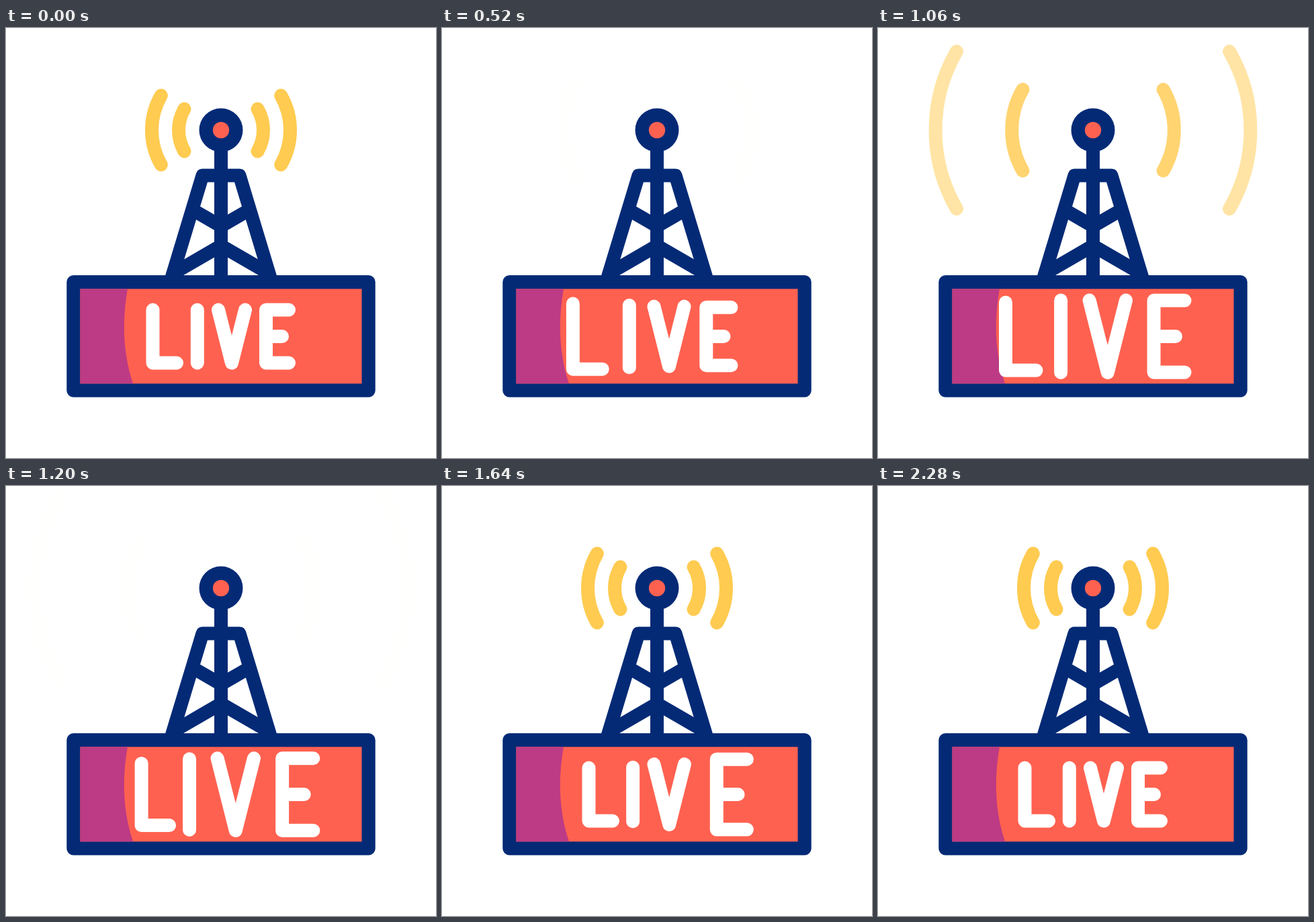
Animation of 640x640 px, one loop 2400 ms. Source, as an HTML page:

```html
<!DOCTYPE html>
<html lang="en">
<head>
<meta charset="utf-8">
<title>Live broadcast</title>
<style>
  html, body { margin: 0; width: 100%; height: 100%; overflow: hidden; background: #fff; }
  svg { display: block; width: 100vw; height: 100vh; }
  .line { fill: none; stroke-width: 20; stroke-linecap: round; stroke-linejoin: round; }
  .navy { stroke: #042a76; }
  .wave { stroke: #ffcb50; }
  .letter { stroke: #fff; }
</style>
</head>
<body>
<svg viewBox="0 0 640 640" role="img" aria-label="LIVE">
  <clipPath id="band"><rect id="bandRect" x="0" width="640"/></clipPath>
  <g clip-path="url(#band)"><path id="outer" class="line wave"/></g>
  <path id="inner" class="line wave"/>

  <g class="line navy">
    <path d="M244 380L292.5 219.5H347.5L396 380"/>
    <path d="M320 180V376"/>
    <path d="M279 271.3L320 295L361 271.3"/>
    <path d="M250 364.5L320 324L390 364.5"/>
  </g>
  <circle cx="320" cy="152" r="32.5" fill="#042a76"/>
  <circle cx="320" cy="152" r="12.2" fill="#ff6150"/>

  <rect x="90.3" y="368" width="459.4" height="181.5" rx="10" fill="#042a76"/>
  <rect x="110.5" y="388.3" width="419" height="141" fill="#ff6150"/>
  <path d="M110.5 388.3H181C172.5 436 174 484 189 529.3H110.5Z" fill="#bd3b84"/>
  <g id="word"></g>
</svg>
<script>
const LOOP = 2400;
const $ = id => document.getElementById(id);

// Letter strokes as offsets from the sign centre (320, 459)
const SIGN = { x: 320, y: 459 };
const GROWTH = 0.36;
const letters = [
  { lines: [[-101.5, -39.5, -101.5, 39.5, -66, 39.5]], rise: [0, 870], fall: [870, 1500] },
  { lines: [[-35.2, -39.5, -35.2, 39.5]], rise: [150, 920], fall: [1097, 1729] },
  { lines: [[-4, -39.5, 16, 39.5, 36, -39.5]], rise: [212, 990], fall: [1264, 1913] },
  { lines: [[101, -39.5, 67, -39.5, 67, 39.5, 101, 39.5], [67, 0, 91, 0]],
    rise: [207, 1148], fall: [1490, 2275] }
];

// Each wave leaves its rest radius, crosses once from the centre, then returns to rest
const HUB = { x: 320, y: 152 };
const waves = [
  { el: $('outer'), rest: 103, from: 7, to: 280, fade: [190, 280], cuts: [550, 1240, 1504] },
  { el: $('inner'), rest: 63, from: 0, to: 140, fade: [113, 141], cuts: [550, 1216, 1490] }
];

for (const l of letters) {
  l.el = document.createElementNS('http://www.w3.org/2000/svg', 'path');
  l.el.setAttribute('class', 'line letter');
  $('word').append(l.el);
}

function ease(v, a, b) {
  const x = Math.min(1, Math.max(0, (v - a) / (b - a)));
  return x * x * (3 - 2 * x);
}

const mix = (a, b, k) => a + (b - a) * k;

function radius(w, t) {
  const [a, b, c] = w.cuts;
  if (t < a) return mix(w.rest, w.to, ease(t, 0, a));
  if (t < b) return mix(w.from, w.to, ease(t, a, b));
  return mix(w.from, w.rest, ease(t, b, c));
}

function arcs(r) {
  const dx = r * Math.cos(Math.PI / 6), top = HUB.y - r / 2, end = HUB.y + r / 2;
  const side = (x, sweep) => `M${x} ${top}A${r} ${r} 0 0 ${sweep} ${x} ${end}`;
  return side(HUB.x - dx, 0) + side(HUB.x + dx, 1);
}

function outline(lines, s) {
  return lines.map(p => {
    let d = '';
    for (let i = 0; i < p.length; i += 2)
      d += (i ? 'L' : 'M') + (SIGN.x + p[i] * s) + ' ' + (SIGN.y + p[i + 1] * s);
    return d;
  }).join('');
}

function draw(t) {
  for (const w of waves) {
    const r = radius(w, t);
    w.el.setAttribute('d', arcs(Math.max(r, 0.01)));
    w.el.setAttribute('opacity', 1 - ease(r, ...w.fade));
  }
  const half = radius(waves[0], t) * 62 / 103;
  $('bandRect').setAttribute('y', HUB.y - half);
  $('bandRect').setAttribute('height', 2 * half);

  for (const l of letters) {
    const s = 1 + GROWTH * (ease(t, ...l.rise) - ease(t, ...l.fall));
    l.el.setAttribute('d', outline(l.lines, s));
  }
}

const start = performance.now();
function tick() {
  draw((performance.now() - start) % LOOP);
  requestAnimationFrame(tick);
}
draw(0);
requestAnimationFrame(tick);
</script>
</body>
</html>
```
